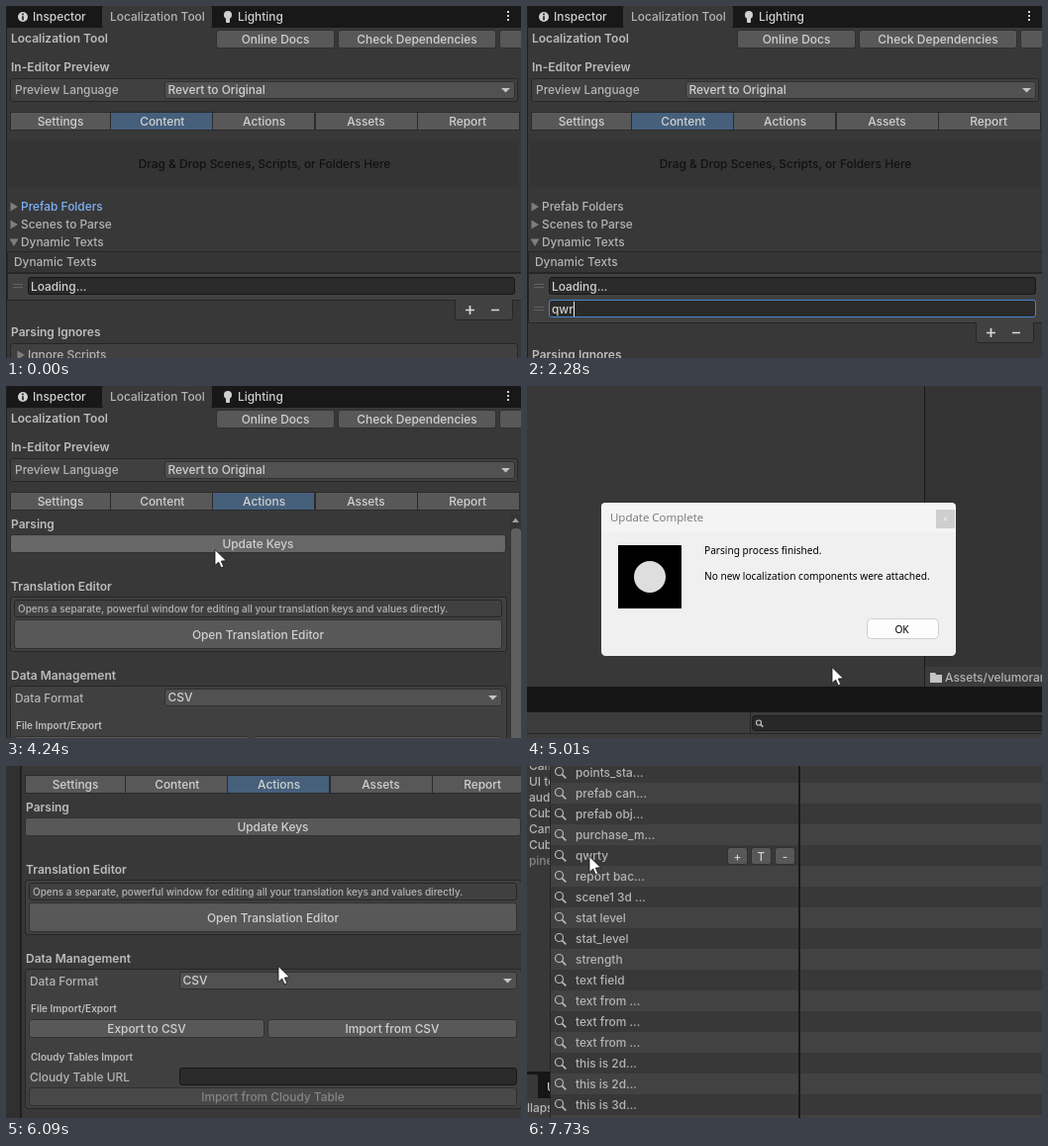
Animation, 520 px wide and 356 px high, one loop 8 s. Source, as an HTML page:

```html
<!DOCTYPE html>
<html lang="en">
<head>
<meta charset="utf-8">
<title>Localization tool walkthrough</title>
<style>
  html, body { margin: 0; width: 100%; height: 100%; overflow: hidden; background: #383838; }
  svg { display: block; width: 520px; height: 356px; }
  text { font: 450 11.9px Inter, sans-serif; fill: #b4b4b4; white-space: pre; }
  .bold { font-weight: 600; font-size: 12px; fill: #bcbcbc; }
  .small { font-size: 10px; }
  .mid { text-anchor: middle; }
  .bright { fill: #d0d0d0; }
  .dim { fill: #858585; }
  .dark { fill: #111; }
  .win { font: 10.15px "Noto Sans", "Open Sans", sans-serif; fill: #000; }
  .title { font: 11.5px "Open Sans", "Noto Sans", sans-serif; fill: #777; }
</style>
</head>
<body>
<svg id="stage" viewBox="0 0 520 356"></svg>
<script>
const LOOP = 8000;
const EDGE = '#262626', BUTTON = '#585858', HOVER = '#676767', PRESSED = '#46607c';

const box = (x1, y1, x2, y2, fill, stroke, r = 0, id = '') =>
  stroke
    ? `<rect ${id && `id="${id}"`} x="${x1 + .5}" y="${y1 + .5}" width="${x2 - x1 - 1}" height="${y2 - y1 - 1}" rx="${r}" fill="${fill}" stroke="${stroke}"/>`
    : `<rect ${id && `id="${id}"`} x="${x1}" y="${y1}" width="${x2 - x1}" height="${y2 - y1}" rx="${r}" fill="${fill}"/>`;
const text = (x, y, s, cls = '', id = '') =>
  `<text ${id && `id="${id}"`} x="${x}" y="${y}" class="${cls}">${s}</text>`;
const shape = (d, fill = 'none', stroke = 'none', w = 1) =>
  `<path d="${d}" fill="${fill}" stroke="${stroke}" stroke-width="${w}"/>`;
const group = (id, body) => `<g id="${id}">${body}</g>`;

const button = (x1, y1, x2, y2, label, id = '', cls = 'bright', fill = BUTTON) =>
  box(x1, y1, x2, y2, fill, '#303030', 2.5, id) +
  text((x1 + x2) / 2, (y1 + y2) / 2 + 4.5, label, 'mid ' + cls);
const dropdown = (x1, y1, x2, y2, label) =>
  box(x1, y1, x2, y2, '#515151', '#303030', 2.5) +
  text(x1 + 3.5, y1 + 13, label, 'bright') +
  shape(`M${x2 - 14} ${y1 + 7}h9l-4.5 4.5z`, '#c4c4c4');
const panel = (x1, y1, x2, y2) => box(x1, y1, x2, y2, '#404040', EDGE, 2.5);
const foldout = (x, y, label, open, id = '') =>
  shape(open ? `M${x - 4.5} ${y - 3.5}h9l-4.5 7.5z` : `M${x - 3.5} ${y - 4.5}v9l7.5 -4.5z`, '#7d7d7d') +
  text(x + 7, y + 4, label, '', id);
const field = (y, id = '') =>
  shape(`M7 ${y + 7.5}h10M7 ${y + 10.5}h10`, 'none', '#626262') +
  box(22, y, 514, y + 18, '#2a2a2a', '#171717', 2.5, id);
const lens = (x, y, r, color) =>
  `<circle cx="${x}" cy="${y}" r="${r}" fill="none" stroke="${color}" stroke-width="1.2"/>` +
  shape(`M${x + r * .7} ${y + r * .7}l${r} ${r}`, 'none', color, 1.7);

function tabs(active) {
  return ['Settings', 'Content', 'Actions', 'Assets', 'Report'].map((name, i) => {
    const x = 2 + i * 103.2;
    return box(Math.max(4, Math.round(x)), 107, Math.round(x + 104), 126, i === active ? PRESSED : BUTTON, '#2b2b2b') +
      text(55 + i * 102.8, 121, name, 'mid bright');
  }).join('');
}

function header() {
  return box(0, 0, 520, 22, '#181818') + box(97, 0, 208, 22, '#383838', '', 2) +
    '<circle cx="17" cy="11" r="5" fill="#d0d0d0"/>' + shape('M17 7.6v1.6M17 10.2v4', 'none', '#181818', 1.6) +
    text(27, 15, 'Inspector', 'bright') + text(105, 15, 'Localization Tool') +
    '<circle cx="224" cy="9" r="4" fill="#d0d0d0"/>' + box(222, 12, 226, 17, '#d0d0d0', '', 1) +
    text(234, 15, 'Lighting', 'bright') +
    [6, 10, 14].map(y => box(506, y - 1, 508, y + 1, '#d0d0d0')).join('') +
    text(5, 37, 'Localization Tool', 'bold') +
    button(212, 24, 332, 43, 'Online Docs') + button(335, 24, 495, 43, 'Check Dependencies') +
    button(498, 24, 560, 43, '') +
    text(5, 66, 'In-Editor Preview', 'bold') + panel(4, 73, 517, 97) +
    text(9, 89, 'Preview Language') + dropdown(160, 76, 514, 94, 'Revert to Original');
}

function contentPage() {
  const footer = box(453, 296, 512, 318, '#414141', EDGE, 2.5) + box(454, 295, 511, 298, '#414141') +
    shape('M464 307.5h9M468.5 303v9M490 307.5h8', 'none', '#d8d8d8', 1.7) +
    text(5, 334, 'Parsing Ignores', 'bold') + panel(4, 341, 517, 400) + foldout(15, 353, 'Ignore Scripts');
  return tabs(1) + box(2, 135, 518, 184, '#343434') +
    text(261, 163.5, 'Drag &amp; Drop Scenes, Scripts, or Folders Here', 'mid dark') +
    foldout(8, 203, 'Prefab Folders', false, 'prefab') + foldout(8, 221, 'Scenes to Parse') +
    foldout(8, 239, 'Dynamic Texts', true) +
    box(1, 248, 521, 270, '#353535', EDGE) + text(8, 262.5, 'Dynamic Texts') +
    box(1, 270, 521, 298, '#414141', EDGE) + field(274) + text(25, 287.5, 'Loading...', 'bright') +
    group('newRow', box(1, 295, 521, 321, '#414141', EDGE) + box(2, 292, 520, 297, '#414141') +
      field(297, 'newField') +
      box(25, 299, 80, 313, '#2c5d87', '', 0, 'selection') + text(25, 310.5, '', 'bright', 'typed') +
      box(46, 299, 47, 314, '#e8e8e8', '', 0, 'caret')) +
    group('footer', footer);
}

function actionsPage() {
  return tabs(2) + text(5, 144, 'Parsing', 'bold') +
    button(4, 150, 505, 169, 'Update Keys', 'update') +
    text(5, 207, 'Translation Editor', 'bold') + panel(4, 213, 506, 269) +
    box(8, 216, 501, 234, '#404040', EDGE, 2.5) +
    text(12, 229, 'Opens a separate, powerful window for editing all your translation keys and values directly.', 'small') +
    button(8, 236, 501, 266, 'Open Translation Editor', 'open') +
    text(5, 297, 'Data Management', 'bold') + panel(4, 303, 506, 445) +
    text(9, 320, 'Data Format') + dropdown(160, 306, 501, 324, 'CSV') +
    text(10, 347, 'File Import/Export', 'bold small') +
    button(8, 354, 246, 373, 'Export to CSV') + button(249, 354, 501, 373, 'Import from CSV') +
    text(10, 396, 'Cloudy Tables Import', 'bold small') +
    text(9, 416.5, 'Cloudy Table URL') + box(160, 403, 501, 421, '#2a2a2a', '#171717', 2.5) +
    button(8, 423, 501, 442, 'Import from Cloudy Table', '', 'dim', '#484848') +
    box(509, 130, 520, 470, '#343434') + shape('M511 138h7l-3.5 -4.5z', '#a0a0a0') +
    box(510, 144, 520, 470, '#5f5f5f', '', 4);
}

function dialogScene() {
  return box(0, 0, 520, 356, '#383838') + box(402, 0, 520, 284, '#333') + box(401, 0, 402, 304, '#1a1a1a') +
    box(402, 284, 520, 304, '#3c3c3c') + shape('M407 290h5l1.5 2h5.5v8h-12z', '#c4c4c4') +
    text(422, 299, 'Assets/velumoran') +
    box(0, 304, 520, 330, '#161616') + box(0, 330, 520, 356, '#3c3c3c') +
    box(225, 330, 226, 351, EDGE) + box(0, 351, 520, 352, EDGE) +
    box(227, 333, 540, 349, '#282828', '#1c1c1c', 3) + lens(234, 340.5, 2.5, '#c0c0c0') +
    group('dialog',
      box(75, 118, 433, 273, '#f0f0f0', '', 4.5) + box(75, 118, 433, 148, '#f4f4f4', '', 4.5) +
      text(84, 137, 'Update Complete', 'title') + box(413, 125, 432, 144, '#cecece') +
      shape('M421 133l3 3m0 -3l-3 3', 'none', '#f4f4f4') +
      box(92, 161, 156, 225, '#000') + '<circle cx="124" cy="193" r="16" fill="#dedede"/>' +
      text(179, 170, 'Parsing process finished.', 'win') +
      text(179, 196, 'No new localization components were attached.', 'win') +
      box(343, 235, 416, 256, '#fdfdfd', '#cfcfcf', 4, 'ok') + text(378.5, 250, 'OK', 'win mid'));
}

function listScene() {
  const keys = ['points_sta...', 'prefab can...', 'prefab obj...', 'purchase_m...', 'qwrty', 'report bac...',
    'scene1 3d ...', 'stat level', 'stat_level', 'strength', 'text field', 'text from ...', 'text from ...',
    'text from ...', 'this is 2d...', 'this is 2d...', 'this is 3d...'];
  const rows = keys.map((key, i) => {
    const y = 7 + i * 21;
    return box(24, y - 11, 520, y + 10, i % 2 ? '#424242' : '#383838') +
      lens(32.5, y - 1.5, 4, '#b8b8b8') + text(49, y + 4, key);
  }).join('');
  const names = ['Canvas', 'UI tools', 'audio', 'Cube', 'Canvas', 'Cube']
    .map((name, i) => text(2, 4 + i * 16, name)).join('');
  return box(0, 0, 520, 356, '#383838') + names + text(2, 100, 'pine', 'dim') +
    box(0, 309, 24, 336, '#161616') + box(-5, 312, 11, 340, '#383838', '', 2) + box(0, 336, 24, 356, '#3c3c3c') +
    text(20, 329, 'U', 'bright') + text(0, 350, 'llaps') +
    box(24, 0, 520, 356, '#383838') + rows + box(24, 353, 520, 356, '#424242') +
    box(23, 0, 24, 356, '#242424') + box(274, 0, 276, 356, '#191919') +
    group('rowButtons', button(202, -9, 223, 9, '+') + button(226, -9, 247, 9, 'T') + button(250, -9, 271, 9, '-'));
}

document.getElementById('stage').innerHTML =
  box(0, 0, 520, 356, '#303030') +
  group('inspector', box(-1, 0, 540, 470, '#383838') + header() + group('content', contentPage()) +
    group('actions', actionsPage()) + box(-1, 0, 1, 470, '#1f1f1f')) +
  group('dialogView', dialogScene()) + group('listView', listScene()) +
  group('cursor', shape('M0 -.5V15.5L3.7 12.1L6.2 17.8L8.8 16.7L6.3 11.1L11.4 10.7Z', '#fff', '#111', .8));

const el = {};
document.querySelectorAll('[id]').forEach(node => el[node.id] = node);

// Pointer stops: time, x, y. Two stops at one time make a hard cut.
const stops = [
  [0, 476, 360], [240, 476, 358], [560, 472, 304], [760, 472, 304], [1480, 86, 300], [1530, 86, 300],
  [1830, -16, 303], [2840, -16, 345], [3240, 77, 337], [3390, 77, 337], [3690, 168, 358], [3840, 168, 360],
  [3840, 279, 111], [3940, 279, 111], [4240, 211, 166], [4490, 211, 166],
  [4490, 540, 215], [5010, 308, 285], [5080, 308, 285], [5180, 331, 270], [5480, 372, 246], [6090, 372, 246],
  [6090, 275, 203], [6160, 275, 203], [6410, 264, 152], [6710, 264, 152],
  [6710, 205, 330], [6910, 128, 245], [6960, 128, 245], [7380, 66, 83], [7530, 66, 83], [7730, 63, 92], [8000, 63, 92]
];
const typing = [[0, 'Loading...'], [2080, 'q'], [2180, 'qw'], [2280, 'qwr'], [2590, 'qwrt'], [2840, 'qwrty']];

function pointerAt(t) {
  const i = stops.findIndex(stop => stop[0] > t);
  const [t0, x0, y0] = stops[i - 1], [t1, x1, y1] = stops[i];
  const p = (t - t0) / (t1 - t0), e = p * p * (3 - 2 * p);
  return [x0 + (x1 - x0) * e, y0 + (y1 - y0) * e];
}
const show = (node, on) => node.style.display = on ? '' : 'none';
const move = (node, x, y) => node.setAttribute('transform', `translate(${x} ${y})`);
const paint = (node, fill) => node.setAttribute('fill', fill);

function draw(t) {
  const within = (from, to) => t >= from && t < to;
  const [x, y] = pointerAt(t);
  move(el.cursor, x, y);

  const dialogView = within(4490, 6090), listView = t >= 6710;
  show(el.inspector, !dialogView && !listView);
  show(el.dialogView, dialogView);
  show(el.listView, listView);
  show(el.content, t < 3840);
  show(el.actions, t >= 3840);
  move(el.inspector, t >= 6090 ? 15 : 0, t >= 6090 ? -98 : 0);

  const added = t >= 710, focused = t >= 1530;
  el.prefab.style.fill = added ? '' : '#7fb0f5';
  show(el.newRow, added);
  move(el.footer, 0, added ? 23 : 0);
  el.newField.setAttribute('stroke', focused ? '#4488cc' : '#171717');
  const word = typing.filter(step => step[0] <= t).pop()[1];
  if (el.typed.textContent !== word) el.typed.textContent = word;
  show(el.selection, within(1530, 2080));
  const left = Math.min(80, Math.max(25, x));
  el.selection.setAttribute('x', left);
  el.selection.setAttribute('width', 80 - left);
  show(el.caret, t >= 2080);
  if (within(2080, 3840)) el.caret.setAttribute('x', Math.round(25 + el.typed.getComputedTextLength()));

  paint(el.update, within(3840, 4390) ? HOVER : within(4390, 4490) ? PRESSED : BUTTON);
  paint(el.open, t >= 6260 ? HOVER : BUTTON);

  el.dialog.style.opacity = t < 5630 ? Math.min(1, Math.max(0, (t - 4490) / 150)) : t < 5680 ? .5 : 0;
  const okHover = x >= 343 && y <= 256;
  paint(el.ok, okHover ? '#e0eef9' : '#fdfdfd');
  el.ok.setAttribute('stroke', okHover ? '#0078d4' : '#cfcfcf');

  move(el.rowButtons, 0, 7 + Math.floor((y + 4) / 21) * 21);
}

const start = performance.now();
(function tick() {
  draw((performance.now() - start) % LOOP);
  requestAnimationFrame(tick);
})();
</script>
</body>
</html>
```
